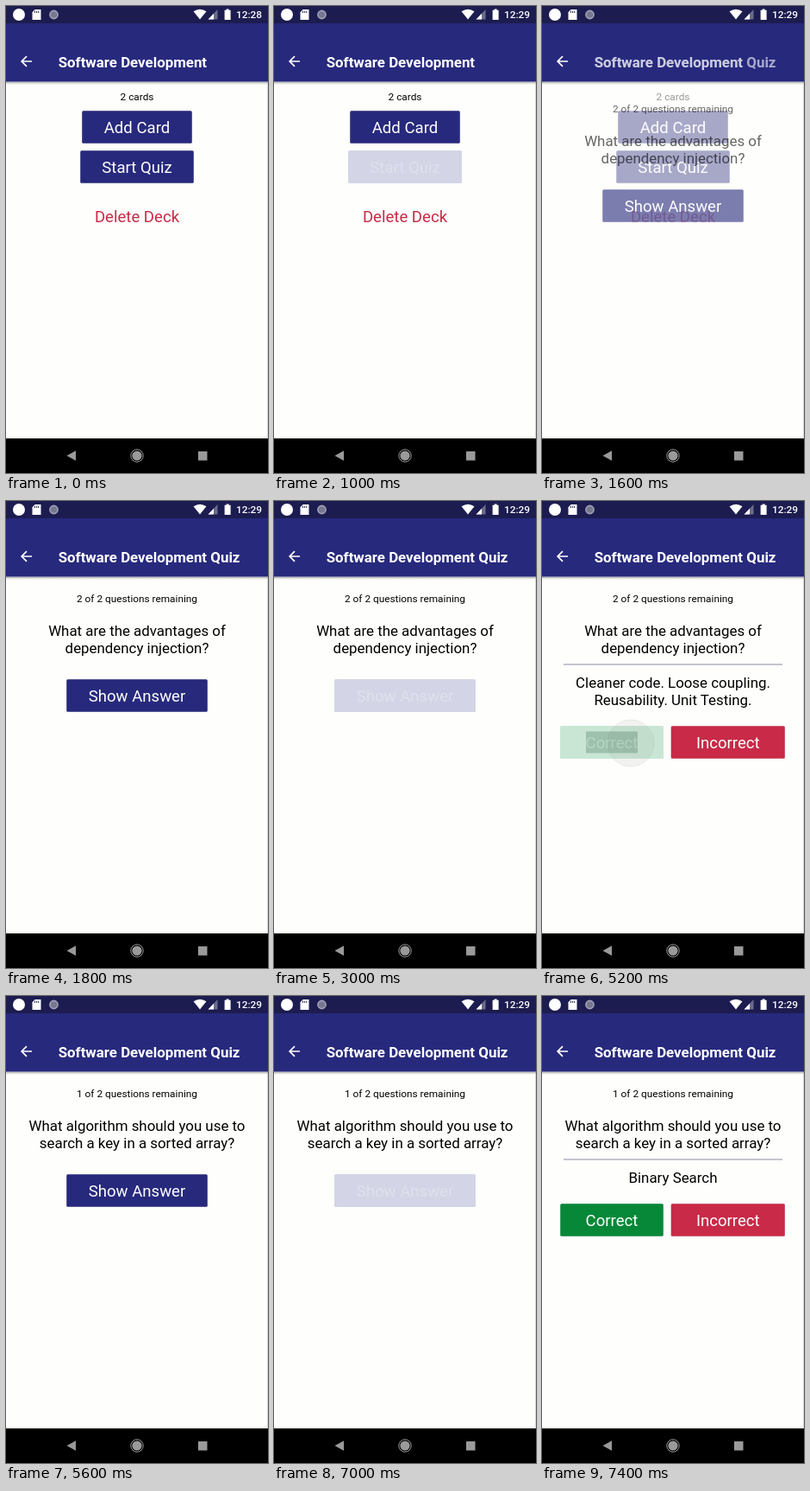
An HTML page for the animation above (8 s loop, 304 by 540 pixels).

```html
<!DOCTYPE html>
<html lang="en">
<head>
<meta charset="utf-8">
<title>Flashcard quiz</title>
<style>
html, body { margin: 0; width: 100%; height: 100%; overflow: hidden; background: #fefefc; }
svg { display: block; width: 100vw; height: 100vh; }
text { font-family: Roboto, sans-serif; }
</style>
</head>
<body>
<svg id="stage" viewBox="0 0 304 540">
  <defs>
    <linearGradient id="shade" x2="0" y2="1">
      <stop stop-color="#777" stop-opacity=".65"/>
      <stop offset="1" stop-color="#999" stop-opacity="0"/>
    </linearGradient>
  </defs>
  <rect width="304" height="540" fill="#fefefc"/>
  <g id="body"></g>
  <rect x="303" y="88" width="1" height="412" fill="#d4d4d4"/>
  <rect y="87.5" width="304" height="3.5" fill="url(#shade)"/>
  <rect width="304" height="87.5" fill="#27297d"/>
  <rect width="304" height="20" fill="#1c1c50"/>
  <g id="titles"></g>
  <path d="M30 64H18.5M24 58.2 18.2 64l5.8 5.8" fill="none" stroke="#fff" stroke-width="1.7"/>
  <g fill="#fff">
    <circle cx="15" cy="10" r="7"/>
    <path d="M33.6 4H40.5V16H30.5V7.2Z"/>
    <path d="M217.5 6.2Q225 1.2 232.5 6.2L225 15.6Z"/>
    <path d="M245.5 4V15.5H234.5Z" opacity=".35"/>
    <path d="M241 8.7V15.5H234.5Z"/>
    <path d="M255.6 3.5H258.6V4.8H260.6V16H253.6V4.8H255.6Z"/>
  </g>
  <path d="M33.5 5.7V8M35.6 5.7V8M37.7 5.7V8" stroke="#1c1c50" stroke-width=".9"/>
  <circle cx="55.5" cy="10" r="4.6" fill="#777792" stroke="#a0a0b4" stroke-width="1.6"/>
  <text id="clock" x="297" y="14.3" font-size="11.82" font-weight="500" text-anchor="end" fill="#fff"></text>
  <rect y="500" width="304" height="40" fill="#000"/>
  <g fill="#9a9a9a">
    <path d="M70.5 520 81 514.3V525.7Z"/>
    <circle cx="152" cy="520" r="5.6"/>
    <circle cx="152" cy="520" r="7.2" fill="none" stroke="#9a9a9a"/>
    <rect x="223" y="515" width="10.5" height="10.5"/>
  </g>
</svg>
<script>
const LOOP = 8000, NAVY = '#27297d', GREEN = '#068838', RED = '#c82a47';
const $ = id => document.getElementById(id);

const text = (str, x, y, size, fill = '#000', more = 'text-anchor="middle"') =>
  `<text x="${x}" y="${y}" font-size="${size}" fill="${fill}" ${more}>${str}</text>`;

const button = (label, x, y, w, fill, tx = x + w / 2) =>
  `<rect x="${x + .25}" y="${y + .25}" width="${w - .5}" height="37.5" rx="1.5" fill="${fill}" stroke="#000" stroke-opacity=".12" stroke-width=".5"/>` +
  text(label, tx, y + 26.4, 18.58, '#fff');

// A pressed button fades almost to white
const faded = (label, x, y, w, fill, ink) =>
  `<rect x="${x}" y="${y}" width="${w}" height="38" rx="1.5" fill="${fill}"/>` +
  text(label, x + w / 2, y + 26.4, 18.58, ink);

const navyButton = (label, x, y, w, pressed) => pressed
  ? faded(label, x, y, w, '#d3d5e6', '#dee0ec')
  : button(label, x, y, w, NAVY);

const lines = (list, y) => list.map((s, i) => text(s, 152, y + 20 * i, 16.89)).join('');

const deck = pressed =>
  text('2 cards', 152, 109, 11.82) +
  navyButton('Add Card', 88, 121, 128) +
  navyButton('Start Quiz', 86, 167, 132, pressed) +
  text('Delete Deck', 152, 250.4, 18.58, RED);

const cards = [
  { ask: ['What are the advantages of', 'dependency injection?'],
    reply: ['Cleaner code. Loose coupling.', 'Reusability. Unit Testing.'] },
  { ask: ['What algorithm should you use to', 'search a key in a sorted array?'],
    reply: ['Binary Search'] }
];

const question = n =>
  text(`${2 - n} of 2 questions remaining`, 152, 117.2, 11.82) + lines(cards[n].ask, 155.8);

const ask = (n, pressed) => question(n) + navyButton('Show Answer', 70, 206, 164, pressed);

const pressedCorrect = y =>
  faded('Correct', 21, y, 120, '#c9e6d5', '#c9e6d5') +
  `<rect x="51" y="${y + 6.5}" width="60" height="25" fill="#9dc1ad"/>` +
  text('Correct', 81, y + 26.4, 18.58, '#b4d8c4') +
  `<circle cx="103" cy="${y + 20}" r="27" fill="#888" fill-opacity=".1" stroke="#888" stroke-opacity=".14"/>`;

function answer(n, pressed) {
  const { reply } = cards[n], y = 220 + 20 * reply.length;
  return question(n) +
    '<rect x="25" y="188.5" width="254" height="1" fill="#8b8ea3"/>' +
    lines(reply, 216.2) +
    button('Incorrect', 149.5, y, 132.5, RED) +
    (pressed ? pressedCorrect(y) : button('Correct', 21, y, 120, GREEN));
}

const layer = (html, opacity, dy = 0) =>
  `<g opacity="${opacity}" transform="translate(0 ${dy})">${html}</g>`;
const title = str => text(str, 60.7, 70.6, 16.89, '#fff', 'font-weight="700"');
const DECK = title('Software Development'), QUIZ = title('Software Development Quiz');

// start time, body, header title
const steps = [
  [0, deck(), DECK],
  [1000, deck(true), DECK],
  [1600, layer(deck(), .4) + layer(ask(0), .6, 6), layer(DECK, .4) + layer(QUIZ, .6)],
  [1800, ask(0), QUIZ],
  [3000, ask(0, true), QUIZ],
  [3400, answer(0), QUIZ],
  [5200, answer(0, true), QUIZ],
  [5400, ask(1), QUIZ],
  [7000, ask(1, true), QUIZ],
  [7200, answer(1), QUIZ]
];

const start = performance.now();
let shown;
function draw(now) {
  const t = Math.max(0, now - start) % LOOP;
  const step = steps.findLast(s => s[0] <= t);
  if (step !== shown) {
    shown = step;
    $('body').innerHTML = step[1];
    $('titles').innerHTML = step[2];
  }
  $('clock').textContent = t < 400 ? '12:28' : '12:29';
  requestAnimationFrame(draw);
}
draw(start);
</script>
</body>
</html>
```
